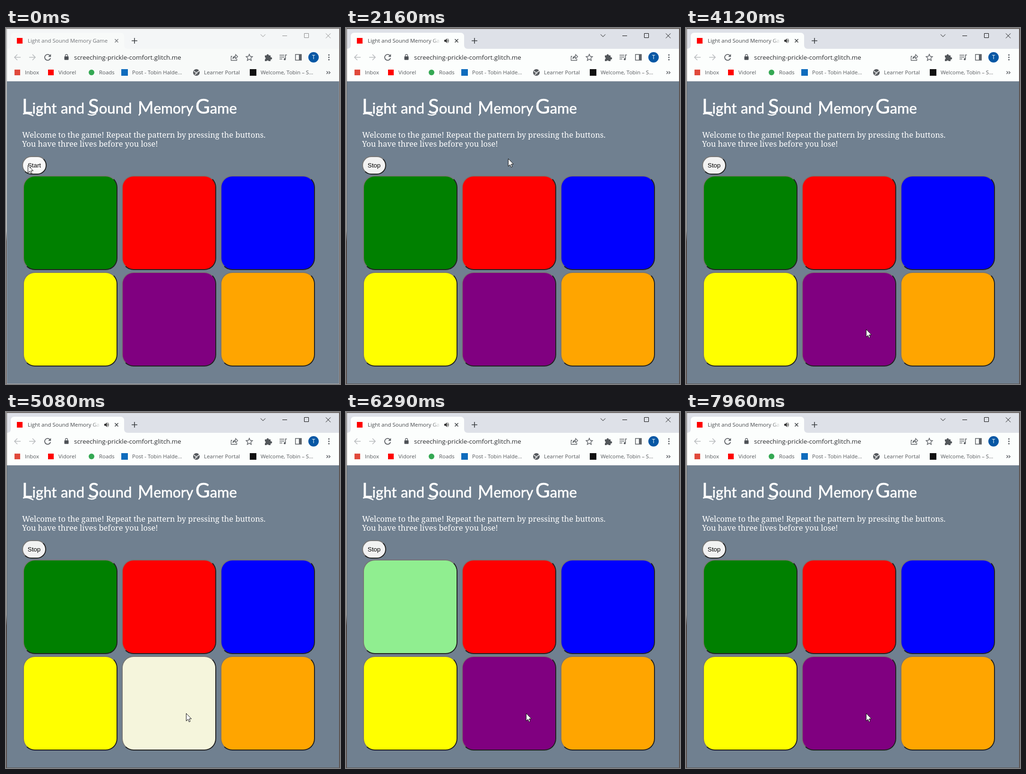
Recreate the animation shown at these times as an HTML page. Size 707 by 753 pixels, loop 8 s.

```html
<!DOCTYPE html>
<html lang="en">
<head>
<meta charset="utf-8">
<title>Light and Sound Memory Game</title>
<style>
  html, body { margin: 0; width: 100%; height: 100%; overflow: hidden; }
  #stage { position: relative; width: 707px; height: 753px; overflow: hidden; background: #708090; }
  svg { position: absolute; left: 0; top: 0; }
  .ui { font: 11.45px "Open Sans", sans-serif; fill: #55585c; }
  .url { font-size: 13.4px; fill: #2b2d30; }
  .head { font: 400 31px Lato, sans-serif; fill: #fff; stroke: #fff; stroke-width: .6; }
  .cap { font-size: 42px; }
  .body { font: 16.5px "Noto Serif", serif; fill: #fff; }
  .line { fill: none; stroke: #5f6368; stroke-width: 1.5; }
  .tile, #start { position: absolute; box-sizing: border-box; border: 2px solid;
    border-color: #767676 #212121 #212121 #767676; border-radius: 25px; }
  .tile { width: 200px; height: 200px; }
  .tile.down { border-color: #212121 #767676 #767676 #212121; }
  #start { left: 34px; top: 271px; height: 39px; line-height: 35px; text-align: center;
    font-family: "Liberation Sans", Arial, sans-serif; font-size: 13.333px; color: #000; }
</style>
</head>
<body>
<div id="stage">
  <svg width="707" height="753" viewBox="0 0 707 753">
    <defs>
      <linearGradient id="fade" gradientUnits="userSpaceOnUse" x1="180" y1="0" x2="200" y2="0">
        <stop offset="0" stop-color="#45484c"/>
        <stop offset="1" stop-color="#45484c" stop-opacity="0"/>
      </linearGradient>
      <linearGradient id="desk" x1="0" y1="0" x2="0" y2="1">
        <stop offset="0" stop-color="#d0d0d0"/>
        <stop offset=".57" stop-color="#d0d0d0"/>
        <stop offset=".6" stop-color="#3a2a28"/>
        <stop offset="1" stop-color="#5a4a48"/>
      </linearGradient>
    </defs>
    <rect width="1" height="753" fill="url(#desk)"/>
    <rect x="706" width="1" height="753" fill="#5a4c4a"/>
    <rect width="707" height="1" fill="#7c7472"/>

    <!-- browser frame -->
    <rect id="strip" x="2" y="2" width="704" height="42"/>
    <path id="tab" d="M2 44Q10 44 10 36V18Q10 10 18 10H242Q250 10 250 18V36Q250 44 258 44Z"/>
    <rect id="bar" x="2" y="44" width="704" height="69"/>
    <rect x="2" y="112" width="704" height="1" fill="#d5d9dd"/>
    <rect id="edge" x="1.5" y="1.5" width="704" height="751" fill="none"/>

    <rect x="23" y="21" width="12" height="12" fill="#f00"/>
    <text id="title" class="ui" x="46" y="31.4"></text>
    <g id="speaker">
      <path d="M208 25h2.5l3-3v10l-3-3h-2.5z" fill="#333"/>
      <path d="M214.5 24.5q2 2.5 0 5M215.3 22.3q4 4.7 0 9.4" fill="none" stroke="#333"/>
    </g>
    <path id="tabClose" class="line" d="M230.5 23.5l7 7m0-7l-7 7"/>
    <path d="M266 27h12m-6-6v12" stroke="#3c4043" stroke-width="1.6"/>
    <g id="caption" fill="none">
      <path d="M539 13.5l5 5 5-5M585 16.5h10M631.5 11.5h9v9h-9zM677 11.5l10 10m0-10l-10 10"/>
    </g>

    <!-- toolbar -->
    <path class="line" style="stroke:#b9bcbf" d="M31 62H18m6-6l-6 6 6 6M49 62h13m-6-6l6 6-6 6"/>
    <path class="line" style="stroke-width:1.8" d="M93 58.2A6.2 6.2 0 1 0 94.2 63.5"/>
    <path d="M95.2 55v6h-6z" fill="#5f6368"/>
    <rect x="123.5" y="60" width="9" height="7.5" rx="1" fill="#4d5156"/>
    <path class="line" style="stroke-width:1.3" d="M125.5 60v-1.5a2.5 2.5 0 0 1 5 0V60"/>
    <text class="ui url" x="144" y="67">screeching-prickle-comfort.glitch.me</text>
    <path class="line" style="stroke-width:1.3" d="M479 60h-2.5v8.5h12V65M480 65q.5-5 6-5.5V56l4.5 4.5-4.5 4.5v-3q-4 0-6 3z"/>
    <path class="line" style="stroke-width:1.4" d="M515 55.5l2 4.5 4.8.5-3.6 3.3 1 4.8-4.2-2.5-4.2 2.5 1-4.8-3.6-3.3 4.8-.5z"/>
    <path d="M548 58h3.5a2.4 2.4 0 1 1 4.8 0H560v4a2.4 2.4 0 1 1 0 4.5v3.5h-4a2.4 2.4 0 0 0-4.5 0H548v-3.8a2.4 2.4 0 0 0 0-4.5z" fill="#53575b"/>
    <path class="line" d="M579 57.5h10m-10 4h10m-10 4h6M591.5 66v-9h3"/>
    <circle cx="590" cy="66" r="2.2" fill="#5f6368"/>
    <rect class="line" x="612.7" y="56" width="12.5" height="12"/>
    <rect x="620" y="56" width="5" height="12" fill="#5f6368"/>
    <circle cx="651" cy="62" r="11" fill="#0657a4"/>
    <text x="651" y="66.3" text-anchor="middle" style="font:12px 'Open Sans',sans-serif" fill="#fff">T</text>
    <g fill="#5f6368">
      <circle cx="683.5" cy="57" r="1.6"/><circle cx="683.5" cy="62" r="1.6"/><circle cx="683.5" cy="67" r="1.6"/>
    </g>

    <!-- bookmarks -->
    <rect x="18" y="88" width="12" height="12" fill="#e04a3c"/>
    <rect x="89" y="88" width="12" height="12" fill="#f00"/>
    <circle cx="181" cy="94" r="6" fill="#34a853"/>
    <rect x="244" y="87" width="14" height="14" fill="#0f6cbd"/>
    <circle cx="403" cy="94" r="7" fill="#55595d"/>
    <path d="M398 91q3 4 6 3t5-4M400 99q2-4 5-2" fill="none" stroke="#fff" stroke-width="1.5"/>
    <rect x="516" y="87" width="14" height="14" fill="#111"/>
    <g id="marks" class="ui"></g>
    <path class="line" d="M678.5 91.5l3 2.8-3 2.8m4.5-5.600l3 2.8-3 2.8"/>

    <!-- page text -->
    <g class="head">
      <text x="34" y="181"><tspan class="cap">L</tspan>ight</text>
      <text x="116" y="181">and</text>
      <text x="174" y="181"><tspan class="cap">S</tspan>ound</text>
      <text x="279" y="181" font-size="30"><tspan font-size="36">M</tspan>emory</text>
      <text x="401" y="181"><tspan class="cap">G</tspan>ame</text>
    </g>
    <path d="M36 182q10-3 22 4M173 182q9 5 18-1M281 185l4-6" fill="none" stroke="#fff" stroke-width="2.5"/>
    <text class="body" x="34" y="232">Welcome to the game! Repeat the pattern by pressing the buttons.</text>
    <text class="body" x="34" y="251">You have three lives before you lose!</text>
  </svg>
  <div id="start"></div>
  <svg width="707" height="753" viewBox="0 0 707 753" style="z-index:2">
    <path id="cursor" d="M.5 .5V16.500L4.200 13 6.500 18.500 9 17.400 6.700 12H11.500Z" fill="#fff" stroke="#111"/>
  </svg>
</div>
<script>
const $ = id => document.getElementById(id);
const LOOP = 8000;
const colors = ["green", "red", "blue", "yellow", "purple", "orange"];
const marks = [[40, "Inbox"], [111, "Vidorel"], [197, "Roads"], [267, "Post - Tobin Halde..."],
  [419, "Learner Portal"], [539, "Welcome, Tobin – S..."]];

// [time, x, y]
const path = [[0, 46, 290], [430, 90, 281], [580, 200, 278], [700, 306, 281], [850, 341, 277],
  [1000, 343, 277], [1150, 343, 276], [2760, 383, 461], [2910, 385, 622], [3060, 381, 637]];
// [from, to, tile, color, pressed]
const lights = [[1270, 2160, 4, "beige"], [3060, 4120, 4, "lavender", true], [5080, 5890, 4, "beige"],
  [6290, 7100, 0, "lightgreen"], [7810, 7960, 4, "lavender", true]];

for (const [x, label] of marks) {
  const el = document.createElementNS("http://www.w3.org/2000/svg", "text");
  el.setAttribute("x", x);
  el.setAttribute("y", 98.2);
  el.textContent = label;
  $("marks").append(el);
}

const tiles = colors.map((c, i) => {
  const el = document.createElement("div");
  el.className = "tile";
  el.style.left = 36 + 209 * (i % 3) + "px";
  el.style.top = 312 + 204 * Math.floor(i / 3) + "px";
  $("stage").append(el);
  return el;
});

const paint = (id, attr, value) => $(id).setAttribute(attr, value);

function render(t) {
  const active = t >= 280, sound = t >= 1640;
  paint("strip", "fill", active ? "#dee1e8" : "#f4f6f7");
  paint("tab", "fill", active ? "#fcfefd" : "#f8faf9");
  paint("bar", "fill", active ? "#fcfefd" : "#f8faf9");
  paint("edge", "stroke", active ? "#5c5856" : "#a8a8a8");
  paint("caption", "stroke", active ? "#111" : "#8c8c8c");
  $("title").style.fill = sound ? "url(#fade)" : active ? "#45484c" : "#707377";
  $("title").textContent = sound ? "Light and Sound Memory Ga" : "Light and Sound Memory Game";
  paint("speaker", "opacity", t < 1640 ? 0 : t < 1760 ? 0.4 : t < 1910 ? 0.8 : 1);
  $("tabClose").style.stroke = active ? "#3c4043" : "#7b7e82";

  $("start").textContent = active ? "Stop" : "Start";
  $("start").style.width = active ? "51px" : "52px";
  $("start").style.background = t < 430 ? "#f8f8f8" : "#f2f2f2";

  const [, x, y] = path.filter(p => p[0] <= t).pop();
  paint("cursor", "transform", `translate(${x} ${y})`);

  tiles.forEach((el, i) => {
    const lit = lights.find(l => l[2] === i && t >= l[0] && t < l[1]);
    el.style.background = lit ? lit[3] : colors[i];
    el.classList.toggle("down", !!(lit && lit[4]));
  });
}

const begin = performance.now();
function tick() {
  render((performance.now() - begin) % LOOP);
  requestAnimationFrame(tick);
}
tick();
</script>
</body>
</html>
```
